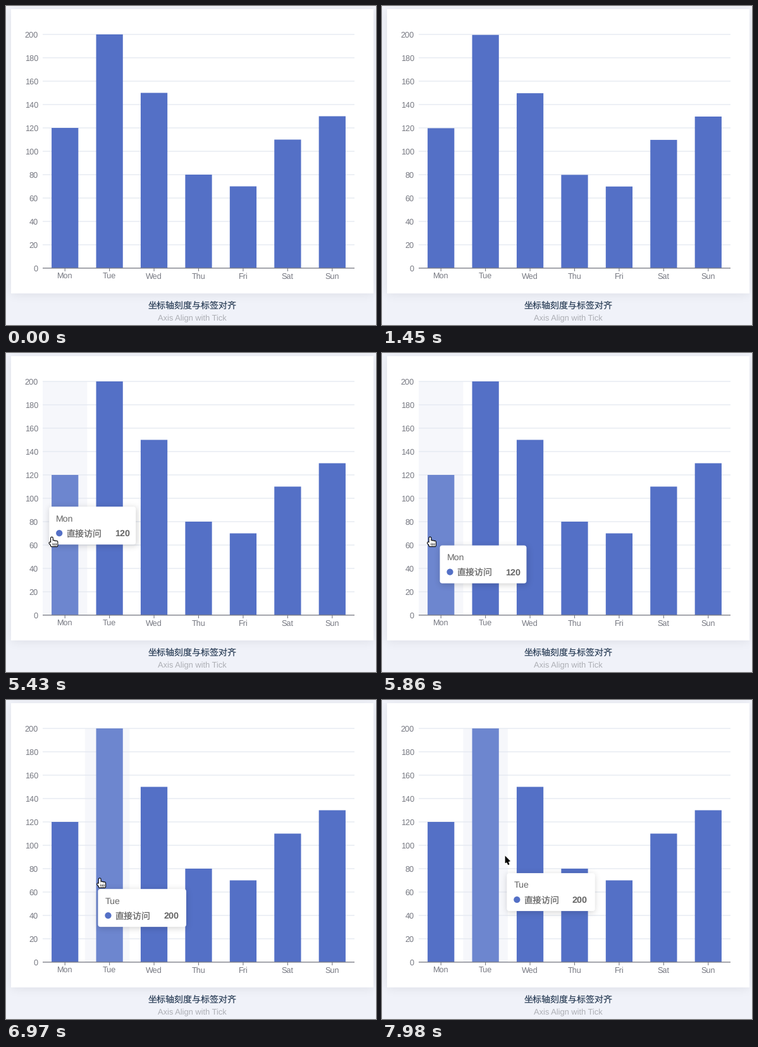
A matplotlib script for the animation above (8 s loop, 585x505 px).

```python
import math

import matplotlib.pyplot as plt
import numpy as np
from matplotlib.animation import FuncAnimation
from matplotlib.patches import Circle, FancyBboxPatch, Polygon, Rectangle
from matplotlib.transforms import Affine2D

W, H, DPI = 585, 505, 80
STEP, LOOP = 20, 8000
PX = 72 / DPI  # points per pixel

DAYS = "Mon Tue Wed Thu Fri Sat Sun".split()
VALUES = [120, 200, 150, 80, 70, 110, 130]
LEFT, RIGHT, TOP, BASE = 58, 551, 45, 415
SLOT = (RIGHT - LEFT) / len(DAYS)
BAR_W = SLOT * 0.6
UNIT = (BASE - TOP) / 200

PAGE, BLUE, LIGHT_BLUE = "#f0f2f9", "#5470c6", "#6d86cf"
LABEL, TIP_TEXT = "#777982", "#666666"
LATIN, CJK = "Liberation Sans", "Noto Sans CJK JP"

# Cursor start, then its eased moves: start ms, length ms, shift
ORIGIN = np.array([-10.0, 293.0])
MOVES = [(4560, 980, (86, -2)), (6490, 630, (86, -11)), (7710, 350, (37, -40))]
GAP = np.array([16, 15])  # tooltip corner from the hot spot

plt.rcParams["text.hinting"] = "none"
fig = plt.figure(figsize=(W / DPI, H / DPI), dpi=DPI, facecolor=PAGE)
ax = fig.add_axes([0, 0, 1, 1])
ax.axis("off")


def shadow(x0, y0, x1, y1, sigma, alpha, z):
    """Rectangle blurred by a Gaussian, as a translucent black image."""
    m = 3 * sigma
    k = sigma * math.sqrt(2)

    def edge(n):
        d = np.arange(n + 2 * m) + 0.5 - m
        return np.array([math.erf((n - v) / k) + math.erf(v / k) for v in d]) / 2

    cover = np.outer(edge(y1 - y0), edge(x1 - x0))
    img = np.zeros(cover.shape + (4,))
    img[..., 3] = cover * alpha
    return ax.imshow(img, extent=(x0 - m, x1 + m, y1 + m, y0 - m), aspect="auto",
                     interpolation="nearest", zorder=z)


def text(x, y, s, size, color, ha="left", font=LATIN, weight="normal", z=3, tr=None):
    return ax.text(x, y, s, size=size * PX, color=color, ha=ha, va="baseline",
                   family=font, weight=weight, zorder=z, transform=tr or ax.transData)


def line(xs, ys, color, width, z=2, tr=None, cap="butt"):
    ln, = ax.plot(xs, ys, color=color, lw=width * PX, zorder=z, snap=False,
                  solid_capstyle=cap, transform=tr or ax.transData)
    return ln


def put(patch, z):
    patch.set_zorder(z)
    patch.set_snap(False)
    ax.add_patch(patch)
    return patch


# Card and captions
shadow(8, 7, 581, 457, 8, 0.075, 0)
put(Rectangle((8, 5), 573, 450, fc="white", lw=0), 0.5)
text(294.5, 478.6, "坐标轴刻度与标签对齐", 14, "#33465e", "center", CJK, 350)
text(294.5, 498.3, "Axis Align with Tick", 12.9, "#adafb5", "center")

# Chart
pointer = put(Rectangle((LEFT, TOP), SLOT, BASE - TOP, fc="#d2dbee", alpha=0.2, lw=0), 1)
for v in range(0, 201, 20):
    y = BASE - v * UNIT
    if v:
        line([LEFT, RIGHT], [y, y], "#e4e8f1", 1.3, 1.5)
    text(51, y + 4.4, str(v), 12.7, LABEL, "right")
bars = []
for i, day in enumerate(DAYS):
    cx = LEFT + (i + 0.5) * SLOT
    bars.append(put(Rectangle((cx - BAR_W / 2, BASE), BAR_W, 0, fc=BLUE, lw=0), 2))
    line([cx, cx], [BASE, BASE + 5], LABEL, 1.1, 2.4)
    text(cx, 431.8, day, 12.6, LABEL, "center")
line([LEFT, RIGHT], [BASE, BASE], LABEL, 1.3, 2.5)

# Tooltip, drawn at the origin and shifted as a group
tip_shift = Affine2D()
tip_tr = tip_shift + ax.transData
shade = shadow(1, 2, 139, 62, 5, 0.18, 5)
shade.set_transform(tip_tr)
tip_box = put(FancyBboxPatch((0, 0), 137, 60, boxstyle="round,pad=0,rounding_size=4",
                             fc="white", lw=0, transform=tip_tr), 6)
tip_dot = put(Circle((16, 42), 5.1, fc=BLUE, lw=0, transform=tip_tr), 7)
tip_day = text(11, 23.2, "", 14.2, TIP_TEXT, z=7, tr=tip_tr)
tip_name = text(27, 47.3, "直接访问", 14, TIP_TEXT, font=CJK, weight=350, z=7, tr=tip_tr)
tip_value = text(103.6, 47, "", 14.4, TIP_TEXT, weight="bold", z=7, tr=tip_tr)
tip = [shade, tip_box, tip_dot, tip_day, tip_name, tip_value]

# Cursors, hot spot at the origin
cur_shift = Affine2D()
cur_tr = cur_shift + ax.transData


def outlined(xs, ys, width, fill, rim, cap):
    """Thick stroke with a rim that merges with its neighbours."""
    return [line(xs, ys, rim, width + 2.2, 9, cur_tr, cap),
            line(xs, ys, fill, width, 10, cur_tr, cap)]


arrow = outlined([3, 6.3], [8, 15.4], 2.5, "black", "white", "butt")
arrow.append(put(Polygon([(0, 0), (0, 13.7), (9.8, 10)], fc="black", ec="white",
                         lw=PX, transform=cur_tr), 9.5))

hand = outlined([-2.7, 1], [9.8, 13.5], 2.4, "white", "black", "round")
for k in range(4):
    x = 2.5 * k
    top = 6.6 + 0.5 * k if k else 2
    hand += outlined([x, x], [top, 13.8], 2.7, "white", "black", "round")
    if k:
        hand.append(line([x - 0.6, x - 0.6], [10.3, 13.6], "black", 0.9, 11, cur_tr))


def smooth(u):
    u = min(max(u, 0), 1)
    return u * u * (3 - 2 * u)


def cursor_at(t):
    return ORIGIN + sum(np.array(d) * smooth((t - t0) / length) for t0, length, d in MOVES)


def growth(t):
    """Bar height share: full, then regrown with cubic in-out easing."""
    if t < 500 or t >= 1450:
        return 1
    u = min(max((t - 573) / 943, 0), 1)
    return 4 * u ** 3 if u < 0.5 else 1 - 4 * (1 - u) ** 3


def build_track():
    """Cursor, active day, tooltip corner and pointer band for every frame."""
    track = []
    box, band = np.array([8.0, 5.0]), LEFT
    tip_k, band_k = 1 - math.exp(-STEP / 115), 1 - math.exp(-STEP / 40)
    for t in range(0, LOOP, STEP):
        p = cursor_at(t)
        day = int((p[0] - LEFT) // SLOT) if p[0] >= LEFT else None
        if day is not None:
            box = box + (p + GAP - box) * tip_k
            band += (LEFT + day * SLOT - band) * band_k
        track.append((p, day, box, band))
    return track


TRACK = build_track()


def show(artists, on):
    for a in artists:
        a.set_visible(on)


ax.set_xlim(0, W)
ax.set_ylim(H, 0)


def draw(i):
    t = i * STEP
    p, day, box, band = TRACK[i]
    ax.set_visible(not 500 <= t < 640)

    g = growth(t)
    for k, (bar, v) in enumerate(zip(bars, VALUES)):
        h = v * UNIT * g
        bar.set_y(BASE - h)
        bar.set_height(h)
        bar.set_facecolor(LIGHT_BLUE if k == day else BLUE)

    hover = day is not None
    show(tip + [pointer], hover)
    if hover:
        pointer.set_x(band)
        tip_shift.clear().translate(*box)
        tip_box.set_width(137 if VALUES[day] < 200 else 139.5)
        tip_day.set_text(DAYS[day])
        tip_value.set_text(str(VALUES[day]))

    seen = t >= 4720
    off = (p[0] - LEFT) % SLOT - SLOT / 2
    on_bar = hover and abs(off) < BAR_W / 2
    show(arrow, seen and not on_bar)
    show(hand, seen and on_bar)
    cur_shift.clear().translate(*p)
    return []


anim = FuncAnimation(fig, draw, frames=LOOP // STEP, interval=STEP, repeat=True,
                     repeat_delay=0, blit=False)
plt.show()
```
